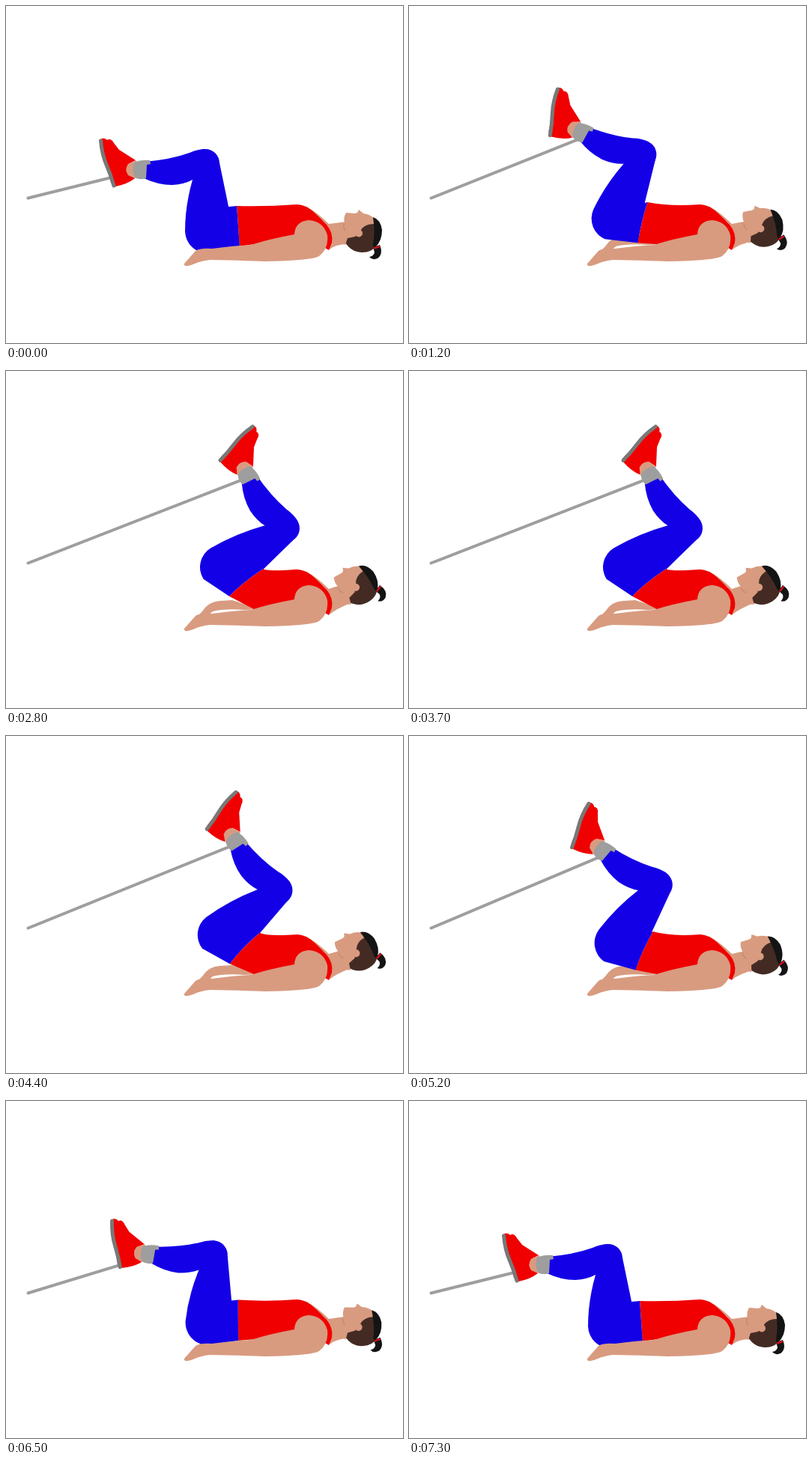
Animation, 530 px wide and 450 px high, one loop 7400 ms. Source, as an HTML page:

```html
<!DOCTYPE html>
<html lang="en">
<head>
<meta charset="utf-8">
<title>Cable reverse crunch</title>
<style>
  html, body { margin: 0; width: 100%; height: 100%; overflow: hidden; background: #fff; }
  svg { display: block; }
  .skin { fill: #d89b80; }
  .red { fill: #f00000; }
  .blue { fill: #1400e6; }
  .grey { fill: #9e9e9e; }
  .brown { fill: #432b24; }
  .black { fill: #141414; }
</style>
</head>
<body>
<svg width="530" height="450" viewBox="0 0 530 450">
  <path id="rope" fill="none" stroke="#9e9e9e" stroke-width="4" stroke-linecap="round"/>

  <!-- far arm -->
  <path class="skin" d="M238 346L262 321Q270 308 285 307L302 306 340 318 318 319Q292 317 276 321L266 330Z"/>
  <path id="neck" class="skin"/>

  <g id="head">
    <path class="brown" d="M492 289L478 292 454 308 452 314Q460 329 476 329Q488 329 493 321Z"/>
    <path class="skin" d="M452 290Q450 283 454 276L466 277 469 276 471 272 477 277Q485 278 491 283V291Q479 291 474 299L466 308 456 310 453 319 444 312Z"/>
    <circle class="skin" cx="471" cy="303.500" r="5"/>
    <path class="black" d="M490 282Q500 285 502 299Q502 314 493 322Q489 322 490 318Q493 302 490 282Z"/>
    <path class="black" d="M490 322L499 319Q504 331 496 337Q489 340 485 335Q491 334 492 329Z"/>
    <path d="M491 323.500L499 321" stroke="#d0101c" stroke-width="2.500"/>
    <path d="M451 291Q450 296 453 300" fill="none" stroke="#c48a70" stroke-width="1.500"/>
  </g>

  <path id="top" class="red"/>
  <path id="thigh" class="blue"/>

  <g id="lowerLeg">
    <path class="skin" d="M174 206L163 211Q158 219 163 228L174 230Z"/>
    <path class="red" d="M126 178Q131 175 135 179Q140 176 144 183L151 192 173 206 163 211Q158 219 163 226L172 230Q162 238 146 241L140 236Z"/>
    <path d="M126.500 180Q128 198 134 212T144 240" fill="none" stroke="#787878" stroke-width="5" stroke-linecap="round"/>
    <path class="blue" d="M185 208Q220 205 245 196Q256 191 266 191L278 224 249 232Q238 238 222 239Q203 239 184 230Z"/>
    <circle class="blue" cx="266" cy="210" r="19"/>
    <path class="grey" d="M171 209Q180 205 192 206L193 211 188 212 187 230Q179 233 172 229Q167 219 171 209Z"/>
  </g>

  <!-- near arm -->
  <path class="skin" d="M238 344L253 327Q258 323 275 324Q305 320 327 319Q352 311 385 305Q386 287 405 286Q424 288 429 306Q431 324 418 334Q408 340 345 341Q292 339 272 339Q260 340 247 346Q237 349 238 344Z"/>
</svg>
<script>
const LOOP = 7400, STEP = 100;
const KNEE_R = 19, HIP_R = 30;
const rad = Math.PI / 180;

const set = (id, name, value) => document.getElementById(id).setAttribute(name, value);
const mix = (a, b, p) => a + (b - a) * p;
const point = (x, y) => ({ x, y, toString: () => `${x.toFixed(2)} ${y.toFixed(2)}` });
const shift = (a, dir, d) => point(a.x + dir.x * d, a.y + dir.y * d);
const turned = (x, y, angle) => {
  const c = Math.cos(angle), s = Math.sin(angle);
  return point(x * c - y * s, x * s + y * c);
};

const ease = v => (1 - Math.cos(Math.PI * Math.min(1, Math.max(0, v)))) / 2;
const progress = t => t < 3000 ? ease(t / 2650) : 1 - ease((t - 3700) / 3550);

function draw(p) {
  // The knee swings on an arc while the lower leg turns as one piece
  const swing = (2 * p - 1) * 0.442;
  const knee = point(319.5 + 125 * Math.sin(swing), 323 - 125 * Math.cos(swing));
  const turn = 60 * p;
  const onLeg = (x, y) => shift(knee, turned(x, y, turn * rad), 1);
  const kneeBack = onLeg(-17, 22);
  const ankle = onLeg(-85, 9 + 9 * Math.min(1, 2.3 * p));
  set('lowerLeg', 'transform', `translate(${knee}) rotate(${turn}) translate(-266 -210)`);
  set('rope', 'd', `M29.500 256.500L${ankle}`);

  // The waist line tilts as the pelvis curls up
  const waist = point(310 + 10.5 * p * p, 294 - 11.5 * p);
  const along = turned(1, 0, (86 + 30 * p + 25 * p * p) * rad);
  const belly = shift(waist, along, -27 - 2 * p);
  const back = shift(waist, along, 27 + 2 * p);
  const waistBend = point(waist.x - 5 * p, waist.y);

  // The thigh joins a knee circle to a hip circle
  const hip = point(269 + 4 * p + 16 * p * p, 300 - 38 * p);
  const axis = turned(1, 0, Math.atan2(hip.y - knee.y, hip.x - knee.x));
  const front = point(axis.y, -axis.x);
  const hipBack = shift(hip, front, -HIP_R);
  const bulge = shift(point(mix(hipBack.x, kneeBack.x, 0.5), mix(hipBack.y, kneeBack.y, 0.5)), front, -5);
  const crease = point(belly.x - 11 * (1 - p) ** 2, belly.y + 1);
  set('thigh', 'd', `M${shift(knee, front, KNEE_R)}L${crease}L${belly}Q${waistBend} ${back}` +
    `L${shift(hip, axis, HIP_R)}A${HIP_R} ${HIP_R} 0 0 1 ${hipBack}Q${bulge} ${kneeBack}L${knee}Z`);
  set('top', 'd', `M${belly}Q350 268 388 265C404 265 416 280 428 292Q437 303 435 316` +
    `L431 326 424 322 331 318 ${back}Q${waistBend} ${belly}Z`);

  set('head', 'transform',
    `translate(${mix(470, 466, p)} ${mix(303, 289, p)}) rotate(${-34 * p}) translate(-470 -303)`);
  set('neck', 'd', `M400 267Q416 276 431 291L${mix(454, 446, p)} ${mix(288, 286, p)}` +
    `L${mix(456, 462, p)} ${mix(318, 309, p)}Q440 318 432 325L420 310Z`);
}

function frame() {
  const t = performance.now() % LOOP;
  draw(progress(Math.floor(t / STEP) * STEP));
  requestAnimationFrame(frame);
}
frame();
</script>
</body>
</html>
```
